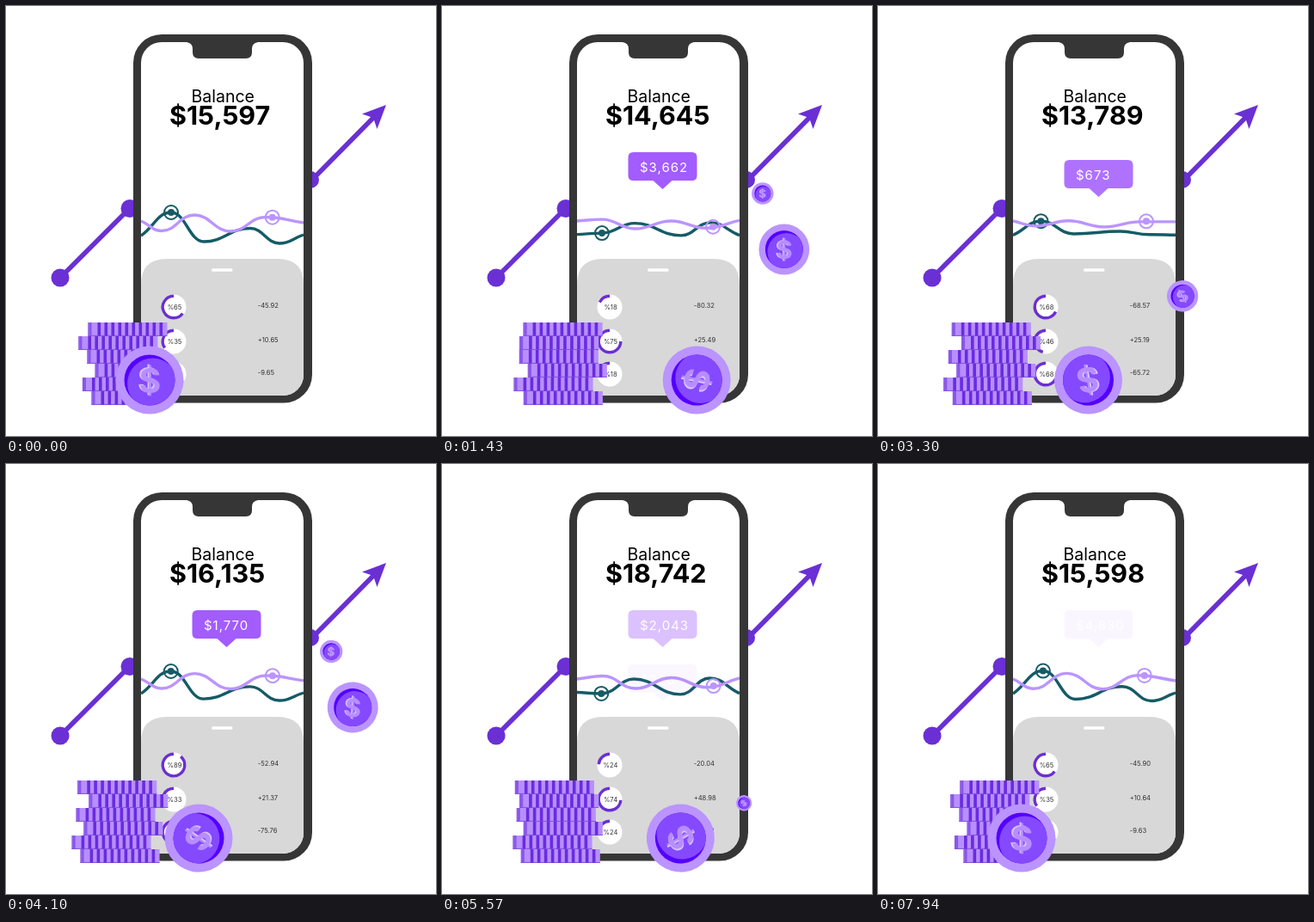
An HTML page that plays this animation: 500x500 px, repeating every 8000 ms.

```html
<!DOCTYPE html>
<html lang="en">
<head>
<meta charset="utf-8">
<title>Balance</title>
<style>
  html, body { margin: 0; width: 100%; height: 100%; overflow: hidden; background: #fff; }
  svg { display: block; width: 100vw; height: 100vh; }
  text { font-family: Poppins, Inter, sans-serif; }
  .tiny { font-size: 7.6px; fill: #333; }
  .arrow { fill: #6a30d4; }
  .arrow path { stroke: #6a30d4; stroke-width: 5.5; }
  .ring { fill: none; stroke: #6a2fd2; stroke-width: 3.4; }
  .curve { fill: none; stroke-width: 3.4; }
</style>
</head>
<body>
<svg viewBox="0 0 500 500">
  <defs>
    <clipPath id="screen"><rect x="157" y="42" width="189" height="411" rx="24"/></clipPath>
    <clipPath id="face"><circle r="29.5"/></clipPath>
    <g id="coin">
      <circle r="39.5" fill="#bb94ff"/>
      <circle r="29.5" fill="#5400ff"/>
      <circle cx="3.5" cy="4" r="29.5" fill="#8549ff" clip-path="url(#face)"/>
      <g font-size="39" font-weight="700" text-anchor="middle">
        <text x="-1.4" y="14" fill="#d9c3ff">$</text>
        <text x="0.6" y="14.6" fill="#b78dff">$</text>
      </g>
    </g>
    <g id="slab">
      <rect width="92" height="16" fill="#b78fff"/>
      <path d="M0 15.4H92M.4 0V16" stroke="#7d4fd0" stroke-width=".9"/>
    </g>
    <path id="bubble" d="M222.500 0H290.500q6 0 6 6V27q0 6-6 6H267.500L256.500 43 245.500 33H222.500q-6 0-6-6V6q0-6 6-6z" fill="#a25cff"/>
  </defs>

  <g class="arrow">
    <path d="M63 316L144 235M354 204L428 129"/>
    <circle cx="63" cy="316" r="10.500"/>
    <circle cx="144" cy="235.500" r="10.500"/>
    <circle cx="354" cy="202" r="10"/>
    <polygon points="442,115 414,125.500 427,130 431.500,143"/>
  </g>

  <rect x="148" y="33" width="208" height="428.500" rx="33" fill="#363636"/>
  <rect x="157" y="42" width="189" height="411" rx="24" fill="#fff"/>
  <path d="M210 41H293V42q-7 1-7 8v4q0 7-7 7H224q-7 0-7-7v-4q0-7-7-8z" fill="#363636"/>
  <text x="215.500" y="111.500" font-size="19.500">Balance</text>
  <text id="total" x="190" y="138" font-size="30.500" font-weight="750"></text>

  <g clip-path="url(#screen)">
    <g id="chart"></g>
    <path d="M157 454V324q0-30 30-30H316q30 0 30 30V454z" fill="#d8d8d8"/>
  </g>
  <rect x="239" y="305.300" width="24.500" height="3.400" rx="1.500" fill="#fff"/>
  <g id="rows"></g>
  <g id="bubbles"></g>
  <g id="stack"></g>
  <g id="coins"></g>
</svg>

<script>
const LOOP = 8000;
const $ = id => document.getElementById(id);

function set(el, attrs) {
  for (const k in attrs) el.setAttribute(k, attrs[k]);
}
function add(parent, tag, attrs = {}) {
  const el = document.createElementNS("http://www.w3.org/2000/svg", tag);
  set(el, attrs);
  return parent.appendChild(el);
}
const clamp = v => Math.min(1, Math.max(0, v));
const smooth = v => (v = clamp(v), v * v * (3 - 2 * v));
const mix = (a, b, p) => a + (b - a) * p;
const money = v => "$" + Math.round(v).toLocaleString("en-US");

// Value over time through [time, value] keys
const track = (keys, ease = clamp) => t => {
  const i = Math.max(1, keys.findIndex(k => k[0] >= t));
  const [t0, v0] = keys[i - 1], [t1, v1] = keys[i];
  return mix(v0, v1, ease((t - t0) / (t1 - t0)));
};
// Cycle that returns to its first value and rests there
const cycle = (first, keys, ease) =>
  track([[0, first], ...keys, [7940, first], [LOOP, first]], ease);

const total = cycle(15598, [[3193, 13472], [5171, 19273]]);
const rollX = cycle(167, [[1500, 297], [4300, 223], [5900, 284]], smooth);
const shareA = cycle(65, [[1420, 18], [4200, 91.5], [6060, 0]]);
const shareB = cycle(35, [[1420, 75.5], [4200, 31.4], [6060, 89]]);
const listed = [
  { y: 350, share: shareA, amount: cycle(-45.9, [[2000, -94], [4200, -51], [6060, -9]]) },
  { y: 390, share: shareB, amount: cycle(10.64, [[2000, 31.4], [4200, 20.9], [6060, 59]]) },
  { y: 428, share: shareA, amount: cycle(-9.63, [[2000, -49.4], [4200, -77], [6060, -40.8]]) }
];

// Rows with percentage rings
const rows = listed.map(row => {
  const g = $("rows"), y = row.y;
  add(g, "circle", { cx: 195, cy: y, r: 14.5, fill: "#fff" });
  row.arc = add(g, "path", { class: "ring" });
  row.label = add(g, "text", { class: "tiny", x: 196, y: y + 2.8, "text-anchor": "middle" });
  row.value = add(g, "text", { class: "tiny", x: 292.7, y: y + 1.2 });
  return row;
});
function drawRow({ y, share, amount, arc, label, value }, t) {
  const n = Math.round(share(t)), a = n / 50 * Math.PI, r = 12.8;
  const end = [195 - r * Math.sin(a), y - r * Math.cos(a)];
  set(arc, { d: `M195 ${y - r}A${r} ${r} 0 ${n > 50 ? 1 : 0} 0 ${end}` });
  label.textContent = "%" + n;
  const v = amount(t);
  value.textContent = (v < 0 ? "-" : "+") + Math.abs(v).toFixed(2);
}

// Curves through [x, y, rise] points; inner points also drift sideways
const curves = [
  { color: "#155b66", drift: -9, dot: [192, 240, 36],
    points: [[157, 267, -2], [192, 240, 36], [230, 274, -32], [284, 258.5, 12.5], [318, 276, -36], [346, 266, 1]] },
  { color: "#bb94ff", drift: 8, dot: [309.7, 245.7, 16.5],
    points: [[157, 250, 0], [181, 261.5, -20], [219, 243, 24], [261, 262, -18], [302, 245.5, 19], [346, 252, -4]] }
].map(c => {
  c.line = add($("chart"), "path", { class: "curve", stroke: c.color });
  c.mark = add($("chart"), "g");
  add(c.mark, "circle", { r: 8, fill: "none", stroke: c.color, "stroke-width": 2 });
  add(c.mark, "circle", { r: 4, fill: c.color });
  return c;
});
function drawCurve({ points, drift, dot, line, mark }, p) {
  const last = points.length - 1;
  const move = ([x, y, rise]) => [x + drift * p, y + rise * p];
  const pts = points.map((q, i) => i % last ? move(q) : [q[0], q[1] + q[2] * p]);
  let d = "M" + pts[0];
  for (let i = 0; i < last; i++) {
    const [x0, y0] = pts[i], [x1, y1] = pts[i + 1], dx = (x1 - x0) * 0.45;
    const ya = i === 0 ? mix(y0, y1, 0.4) : y0;
    const yb = i === last - 1 ? mix(y1, y0, 0.4) : y1;
    d += `C${x0 + dx} ${ya} ${x1 - dx} ${yb} ${x1} ${y1}`;
  }
  set(line, { d });
  set(mark, { transform: `translate(${move(dot)})` });
}

// Rising bubbles with counters
const bubbles = [
  { start: 100, fade: 2450, sum: 4100 },
  { start: 2810, fade: 5380, sum: 2043 },
  { start: 5490, fade: 7650, sum: 4830 }
].map(b => {
  b.el = add($("bubbles"), "g");
  add(b.el, "use", { href: "#bubble" });
  b.text = add(b.el, "text", { x: 230, y: 22.5, "font-size": 15, "letter-spacing": 1, fill: "#fff" });
  return b;
});
function drawBubble({ start, fade, sum, el, text }, t) {
  const p = smooth((t - start) / 640);
  set(el, {
    transform: `translate(0 ${mix(236, 170, p)})`,
    opacity: p * (1 - clamp((t - fade) / 305))
  });
  text.textContent = money(sum * clamp((t - start) / 1490));
}

// Coin stack: middle x and time of the rightmost position for each slab
for (let x = 11; x < 90; x += 8) {
  add($("slab"), "rect", { x, width: 3.6, height: 15.5, fill: "#6a2be0" });
}
add($("slab"), "rect", { x: 1, width: 3, height: 15.5, fill: "#8a55ee" });
const slabs = [[89.5, 550], [90.5, 3500], [88, -200], [97, 0], [82.7, -400], [93, -200]]
  .map(([mid, peak], i) => ({ mid, peak, y: 368 + i * 16, el: add($("stack"), "use", { href: "#slab" }) }));
function drawSlab({ mid, peak, y, el }, t) {
  const x = mid + 6.6 * Math.cos((t - peak) / LOOP * 2 * Math.PI);
  set(el, { transform: `translate(${x} ${y})` });
}

// Flying coins: out of the phone, a slow middle, then up and back in
const flyX = track([[520, 351], [2050, 424], [2500, 360]], smooth);
function flyY(age) {
  const v = (age - 520) / 990 - 1;
  return 283 - v ** 3 * Math.abs(v) * (v < 0 ? 128 : 202);
}
const sizes = [
  { from: 520, to: 2500, r: 29.5, dx: 0, dy: 0 },
  { from: 1000, to: 2300, r: 13.5, dx: -25, dy: -65 }
];
const addCoin = () => add($("coins"), "use", { href: "#coin" });
const flyers = [0, 2590, 5017].flatMap(start =>
  sizes.map(size => ({ start, ...size, el: addCoin() })));
const roller = addCoin();

const place = (el, x, y, turn, r) =>
  set(el, { transform: `translate(${x} ${y}) rotate(${turn}) scale(${r / 39.5})` });
function drawFlyer({ start, from, to, r, dx, dy, el }, t) {
  const age = t - start, u = (age - from) / (to - from), on = u > 0 && u < 1;
  set(el, { visibility: on ? "visible" : "hidden" });
  if (on) {
    const radius = r * Math.sin(u * Math.PI) ** 0.4;
    place(el, flyX(age) + dx, flyY(age) + dy, (age - 1430) * 0.04, radius);
  }
}

function draw(t) {
  $("total").textContent = money(total(t));
  const swing = (1 - Math.abs(t % 4000 / 2000 - 1)) ** 1.2;
  curves.forEach(c => drawCurve(c, swing));
  rows.forEach(r => drawRow(r, t));
  bubbles.forEach(b => drawBubble(b, t));
  slabs.forEach(s => drawSlab(s, t));
  flyers.forEach(f => drawFlyer(f, t));
  const x = rollX(t);
  place(roller, x, 435, (x - 167) * 2.18, 39.5);
}

const begin = performance.now();
function tick() {
  draw((performance.now() - begin) % LOOP);
  requestAnimationFrame(tick);
}
tick();
</script>
</body>
</html>
```
